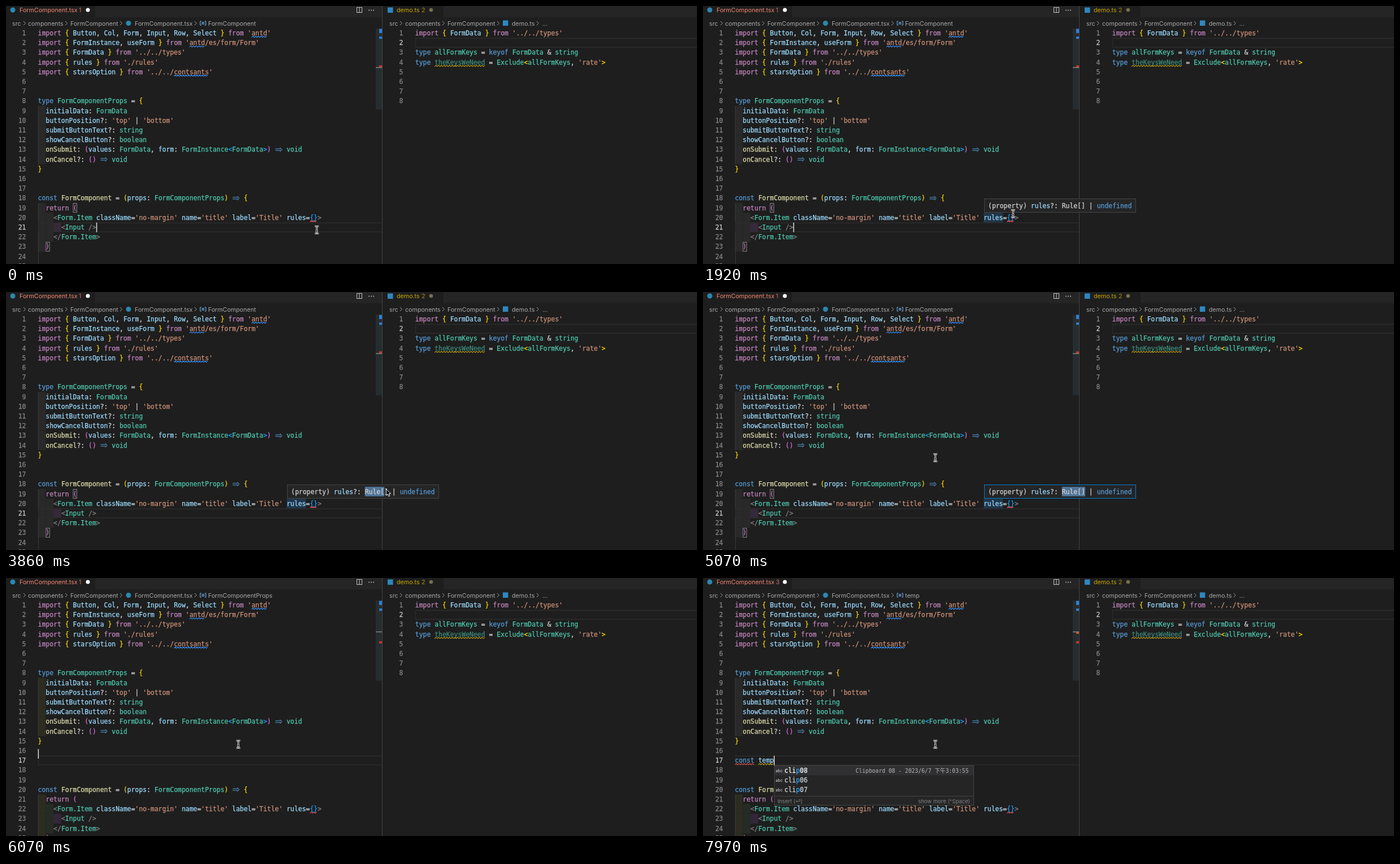
Animation, 1224 px wide and 457 px high, one loop 8 s. Source, as an HTML page with a canvas:

```html
<!DOCTYPE html>
<html lang="en">
<head>
<meta charset="utf-8">
<title>Editor session</title>
<style>
  html, body { margin: 0; width: 100%; height: 100%; overflow: hidden; background: #1e1e1e; }
  canvas { display: block; width: 1224px; height: 457px; }
</style>
</head>
<body>
<canvas id="stage"></canvas>
<script>
const W = 1224, H = 457, LOOP = 8000;
const canvas = document.getElementById('stage');
const ctx = canvas.getContext('2d');
const dpr = window.devicePixelRatio || 1;
canvas.width = W * dpr;
canvas.height = H * dpr;

const CHAR = 6.88, ROW = 17.2, LEFT = 56.6, RIGHT = 724.8;
const MONO = '11.43px "DejaVu Sans Mono", monospace';
const MONO_SMALL = '9.7px "DejaVu Sans Mono", "Noto Sans CJK SC", "Noto Sans CJK", monospace';
const UI = '10.7px Inter, sans-serif';
const UI_SMALL = '9.5px Inter, "DejaVu Sans", sans-serif';
const RED = '#f14c4c', YELLOW = '#cca700', BLUE = '#3794ff';

// Code markup: "~" plus a colour letter starts a token; "~a" is the arrow ligature.
const COLORS = {
  p: '#c586c0', g: '#ffd700', m: '#da70d6', b: '#179fff', v: '#9cdcfe', w: '#d4d4d4', s: '#ce9178',
  k: '#569cd6', t: '#4ec9b0', f: '#dcdcaa', h: '#808080', d: '#3a8c7c', a: '#569cd6'
};

const HEAD = [
  "~pimport ~g{ ~vButton~w, ~vCol~w, ~vForm~w, ~vInput~w, ~vRow~w, ~vSelect ~g} ~pfrom ~s'antd'",
  "~pimport ~g{ ~vFormInstance~w, ~vuseForm ~g} ~pfrom ~s'antd/es/form/Form'",
  "~pimport ~g{ ~vFormData ~g} ~pfrom ~s'../../types'",
  "~pimport ~g{ ~vrules ~g} ~pfrom ~s'./rules'",
  "~pimport ~g{ ~vstarsOption ~g} ~pfrom ~s'../../contsants'",
  '', '',
  '~ktype ~tFormComponentProps ~w= ~g{',
  '~w  ~vinitialData~w: ~tFormData',
  "~w  ~vbuttonPosition~w?: ~s'top' ~w| ~s'bottom'",
  '~w  ~vsubmitButtonText~w?: ~tstring',
  '~w  ~vshowCancelButton~w?: ~tboolean',
  '~w  ~fonSubmit~w: ~m(~vvalues~w: ~tFormData~w, ~vform~w: ~tFormInstance~b<~tFormData~b>~m) ~a=>~t void',
  '~w  ~fonCancel~w?: ~m() ~a=>~t void',
  '~g}'
];
const TAIL = [
  '', '',
  '~kconst ~fFormComponent ~w= ~g(~vprops~w: ~tFormComponentProps~g) ~a=>~g {',
  '~w  ~preturn ~m(',
  "~w    ~h<~tForm.Item ~vclassName~w=~s'no-margin' ~vname~w=~s'title' ~vlabel~w=~s'Title' ~vrules~w=~b{}~h>",
  '~w      ~h<~tInput ~h/>',
  '~w    ~h</~tForm.Item~h>',
  '~w  ~m)',
  '', ''
];
const DEMO = [
  "~pimport ~g{ ~vFormData ~g} ~pfrom ~s'../../types'",
  '',
  '~ktype ~tallFormKeys ~w= ~kkeyof ~tFormData ~w& ~tstring',
  "~ktype ~dtheKeysWeNeed ~w= ~tExclude~g<~tallFormKeys~w, ~s'rate'~g>",
  '', '', '', ''
];

const POINTER = [
  [360, 550, 396], [1140, 518, 377], [1750, 518, 377], [2180, 606, 349], [2360, 606, 349],
  [2620, 643, 349], [2700, 639, 349], [2790, 636, 349], [2970, 635, 350], [3150, 635, 350],
  [3920, 674, 349], [4010, 676, 349], [4510, 676, 349], [5000, 411, 293], [5690, 411, 293], [5900, 411, 294]
];
const TYPED = [
  [6600, 'c'], [6690, 'con'], [6780, 'const'], [6870, 'const '],
  [7170, 'const t'], [7430, 'const te'], [7520, 'const tem'], [7670, 'const temp']
];
const CARET = [
  [-100, 21, 15], [5150, 15, 1], [5690, 16, 0], [6040, 17, 0],
  ...TYPED.map(([time, text]) => [time, 17, text.length])
];

const rowY = line => 48 + (line - 1) * ROW;
const colX = (col, origin = LEFT) => origin + col * CHAR;
const last = (keys, t) => keys.filter(k => k[0] <= t).pop();
const between = (t, a, b) => t >= a && t < b;

function rect(x, y, w, h, color) {
  ctx.fillStyle = color;
  ctx.fillRect(x, y, w, h);
}
function frame(x, y, w, h, color) {
  ctx.strokeStyle = color;
  ctx.lineWidth = 1;
  ctx.strokeRect(x, y, w, h);
}
function dot(x, y, r, color) {
  ctx.fillStyle = color;
  ctx.beginPath();
  ctx.arc(x, y, r, 0, 7);
  ctx.fill();
}
function line(points, color, width = 1) {
  ctx.strokeStyle = color;
  ctx.lineWidth = width;
  ctx.beginPath();
  points.forEach(([x, y]) => ctx.lineTo(x, y));
  ctx.stroke();
}
function label(text, x, y, color, font = UI, align = 'left') {
  ctx.font = font;
  ctx.textAlign = align;
  ctx.fillStyle = color;
  ctx.fillText(text, x, y + 4);
  if (font === MONO) { // a hairline gives the code its slightly heavier weight
    ctx.strokeStyle = color;
    ctx.lineWidth = .25;
    ctx.strokeText(text, x, y + 4);
  }
}
function code(markup, x, y) {
  for (const token of markup.split('~').slice(1)) {
    const color = COLORS[token[0]], text = token.slice(1);
    if (token[0] === 'a') {
      line([[x + .8, y - 1.5], [x + 11, y - 1.5]], color);
      line([[x + .8, y + 1.5], [x + 11, y + 1.5]], color);
      line([[x + 9, y - 3.8], [x + 12.6, y], [x + 9, y + 3.8]], color);
    } else {
      label(text, x, y, color, MONO);
    }
    x += text.length * CHAR;
  }
}
function squiggle(row, col, length, color, origin) {
  const x = colX(col, origin), y = rowY(row) + 6.5, points = [];
  for (let i = 0; i <= length * CHAR; i += 2.4) points.push([x + i, y + (points.length % 2 ? -1 : 1)]);
  line(points, color, 1.1);
}
function bracketBox(row, col) {
  frame(colX(col) + .5, rowY(row) - 8, CHAR - .5, 16, '#888');
}
function lineNumbers(count, active, right) {
  for (let n = 1; n <= count; n++) {
    label(n, right, rowY(n), n === active ? '#c6c6c6' : '#858585', MONO, 'right');
  }
}
function currentLine(row, x, end) {
  const top = rowY(row) - ROW / 2;
  rect(x, top, end - x, 1.5, '#2c2c2c');
  rect(x, top + ROW - 1.5, end - x, 1.5, '#2c2c2c');
  rect(x, top, 1, ROW, '#2c2c2c');
}
function crumbs(x, names) {
  for (const [at, text] of names) label(text, x + at, 30.5, '#a9a9a9');
}
function chevrons(xs) {
  xs.forEach(x => line([[x - 2, 27], [x + 1.5, 30.5], [x - 2, 34]], '#a0a0a0'));
}

function chrome(t) {
  rect(158, 0, 508, 20, '#252526');
  rect(775, 0, 449, 20, '#252526');
  dot(12, 7, 4.5, '#2b87ad');
  label('FormComponent.tsx', 24, 7, '#f48771');
  label(t < 7520 ? '1' : '3', 129, 7, '#d0705c');
  dot(145, 7, 3.5, '#fff');
  frame(621.5, 2.5, 9, 9, '#c5c5c5');
  line([[626, 2], [626, 12]], '#c5c5c5');
  [643, 647, 651].forEach(x => dot(x, 7.5, .9, '#c5c5c5'));

  rect(676, 2.5, 9.5, 9.5, '#2f86c0');
  label('demo.ts', 692, 7, YELLOW);
  label('2', 736, 7, '#a88c10');
  dot(753, 7, 3.3, '#77704f');

  crumbs(0, [[11, 'src'], [39, 'components'], [114, 'FormComponent'], [228, 'FormComponent.tsx'],
    [358, t < 5330 ? 'FormComponent' : t < 7970 ? 'FormComponentProps' : 'temp']]);
  chevrons([33, 107, 204, 336]);
  dot(217, 30.5, 4.5, '#2b87ad');
  line([[346, 27], [344, 27], [344, 34], [346, 34]], '#75beff');
  line([[352, 27], [354, 27], [354, 34], [352, 34]], '#75beff');
  frame(347.5, 29, 3, 3, '#75beff');

  crumbs(668, [[11, 'src'], [39, 'components'], [114, 'FormComponent'], [228, 'demo.ts'], [282, '...']]);
  chevrons([700, 775, 872, 942]);
  rect(880, 25.5, 9.5, 9.5, '#2f86c0');
}

function indents(t, added) {
  const vivid = ['#2c2c21', '#252c25', '#33263a'], grey = ['#292929', '#292929', '#36293a'];
  const block = (row, depth, palette) => {
    for (let i = 0; i < depth; i++) rect(colX(i * 2), rowY(row) - 8.6, 2 * CHAR, ROW, palette[i]);
  };
  for (let row = 9; row < 15; row++) block(row, 1, between(t, 5330, 7440) ? vivid : grey);
  [1, 2, 3, 2, 1].forEach((depth, i) => block(19 + added + i, depth, t < 5330 ? grey : vivid));
  rect(57, rowY(9) - 8.6, 1, 6 * ROW, '#383838');
  rect(57, rowY(19 + added) - 8.6, 1, H, '#383838');
}

function ruler(t, active, added, errorRow) {
  const y = row => 40 + (row - 1) * 3.4;
  const mark = (row, color) => rect(661, y(row) + .5, 5, 4, color);
  rect(655, 40, 11, added ? 142 : 143, '#262d30');
  [1, 2, 5].forEach(row => mark(row, '#2f7fd6'));
  mark(errorRow, '#c4362f');
  if (t >= 7260) mark(17, t < 7440 ? '#b8951c' : '#d0502c');
  rect(655, y(active) + .3, 11, 1.5, '#858585');
}

function leftEditor(t) {
  const added = (t >= 5690) + (t >= 6040);
  const typed = (last(TYPED, t) || [0, ''])[1];
  const active = last(CARET, t)[1];
  const parenError = between(t, 7260, 7440);

  indents(t, added);
  currentLine(active, 57, 666);
  if (between(t, 1300, 5150)) rect(colX(64), rowY(20) - 8.6, 5 * CHAR, ROW, '#20364b');

  const inserted = ['', typed.startsWith('const') ? `~kconst~v${typed.slice(5)}` : `~v${typed}`].slice(0, added);
  [...HEAD, ...inserted, ...TAIL].forEach((markup, i) => code(markup, LEFT, rowY(i + 1)));
  lineNumbers(25, active, 35.4);

  squiggle(1, 55, 4, BLUE);
  squiggle(2, 39, 4, BLUE);
  squiggle(5, 35, 9, BLUE);
  if (parenError) squiggle(19 + added, 9, 1, RED);
  else squiggle(20 + added, 70, 2, RED);
  if (t >= 7260) squiggle(17, 6, typed.length - 6, YELLOW);
  if (t >= 7440) squiggle(17, 0, 5, RED);

  if (t < 5150) { bracketBox(19, 9); bracketBox(23, 2); }
  if (between(t, 5240, 5690)) { bracketBox(8, 26); bracketBox(15, 0); }
  ruler(t, active, added, (parenError ? 19 : 20) + added);
}

function rightEditor() {
  currentLine(2, 725, W);
  DEMO.forEach((markup, i) => code(markup, RIGHT, rowY(i + 1)));
  lineNumbers(8, 2, 703.5);
  squiggle(4, 5, 13, YELLOW, RIGHT);
}

function caret(t) {
  const blinkOn = t < 3290 && (t + 210) % 1000 < 500;
  if (t < 5150 && !blinkOn) return;
  const to = last(CARET, t), from = CARET[CARET.indexOf(to) - 1] || to;
  const k = Math.min(1, (t - to[0]) / 100);
  const glide = i => from[i] + (to[i] - from[i]) * k;
  rect(colX(glide(2)), rowY(glide(1)) - 8.4, 1.5, 17, '#e0e0e0');
}

function tooltip(t, pointerX) {
  if (!between(t, 1290, 5150)) return;
  ctx.globalAlpha = Math.min(1, (t - 1290) / 100);
  rect(498, 341, 269, 25, '#252526');
  frame(498.5, 341.5, 268, 24, t < 4190 ? '#454545' : '#007fd4');
  if (t >= 3150) {
    const chars = t >= 3920 ? 6 : Math.max(0, Math.round((pointerX - 636) / CHAR));
    rect(505 + 19 * CHAR, 345, chars * CHAR, 17, '#4f7397');
  }
  code('~w(property) ~vrules~w?: Rule[] | ~kundefined', 505, 353.5);
  ctx.globalAlpha = 1;
}

function suggestions(t) {
  if (t < 7760) return;
  rect(126, 332, 354, 71, '#252526');
  rect(126, 332.5, 354, 17, '#303032');
  ['08', '06', '07'].forEach((id, i) => {
    const y = 341 + i * ROW, color = i ? '#d4d4d4' : '#fff';
    label('abc', 128.5, y - 1, '#dcdcdc', '7.2px Inter, sans-serif');
    label('cli', 144, y, color, MONO);
    label('p', colX(3, 144), y, '#2aaaff', MONO);
    label(id, colX(4, 144), y, color, MONO);
  });
  label('Clipboard 08 - 2023/6/7 下午3:03:55', 470.5, 340.5, '#b8b8b8', MONO_SMALL, 'right');
  line([[126, 386.5], [480, 386.5]], '#454545');
  label('Insert (⏎)', 132, 394.5, '#858585', UI_SMALL);
  label('show more (^Space)', 473, 394.5, '#858585', UI_SMALL, 'right');
  frame(126.5, 332.5, 353, 70, '#454545');
}

function pointerAt(t) {
  const next = POINTER.findIndex(k => k[0] > t);
  if (next <= 0) return (next ? POINTER[POINTER.length - 1] : POINTER[0]).slice(1);
  const [t0, x0, y0] = POINTER[next - 1], [t1, x1, y1] = POINTER[next];
  const k = (t - t0) / (t1 - t0), e = k * k * (3 - 2 * k);
  return [x0 + (x1 - x0) * e, y0 + (y1 - y0) * e];
}

function pointer(t, x, y) {
  const overTooltip = between(t, 1300, 5150) && between(x, 498, 767) && between(y, 341, 366);
  ctx.save();
  ctx.translate(x, y);
  if (overTooltip) {
    ctx.beginPath();
    [[0, 0], [0, 11.5], [2.7, 9], [4.6, 13], [6.5, 12.2], [4.7, 8.3], [8.3, 8.2]].forEach(p => ctx.lineTo(...p));
    ctx.closePath();
    ctx.fillStyle = '#000';
    ctx.fill();
    ctx.strokeStyle = '#fff';
    ctx.lineWidth = 1;
    ctx.stroke();
  } else {
    ctx.translate(.5, .5);
    for (const [color, width] of [['#fff', 2.6], ['#000', .9]]) {
      line([[-3.6, -6.5], [-1.5, -6.5], [0, -5], [1.5, -6.5], [3.6, -6.5]], color, width);
      line([[-3.6, 6.5], [-1.5, 6.5], [0, 5], [1.5, 6.5], [3.6, 6.5]], color, width);
      line([[0, -5], [0, 5]], color, width);
      line([[-2, 2], [2, 2]], color, width);
    }
  }
  ctx.restore();
}

function draw(t) {
  ctx.setTransform(dpr, 0, 0, dpr, 0, 0);
  rect(0, 0, W, H, '#1e1e1e');
  chrome(t);
  leftEditor(t);
  rightEditor();
  rect(666, 0, 1, H, '#444');
  caret(t);
  const [x, y] = pointerAt(t);
  tooltip(t, x);
  suggestions(t);
  pointer(t, x, y);
}

const start = performance.now();
function tick() {
  draw((performance.now() - start) % LOOP);
  requestAnimationFrame(tick);
}
tick();
</script>
</body>
</html>
```
